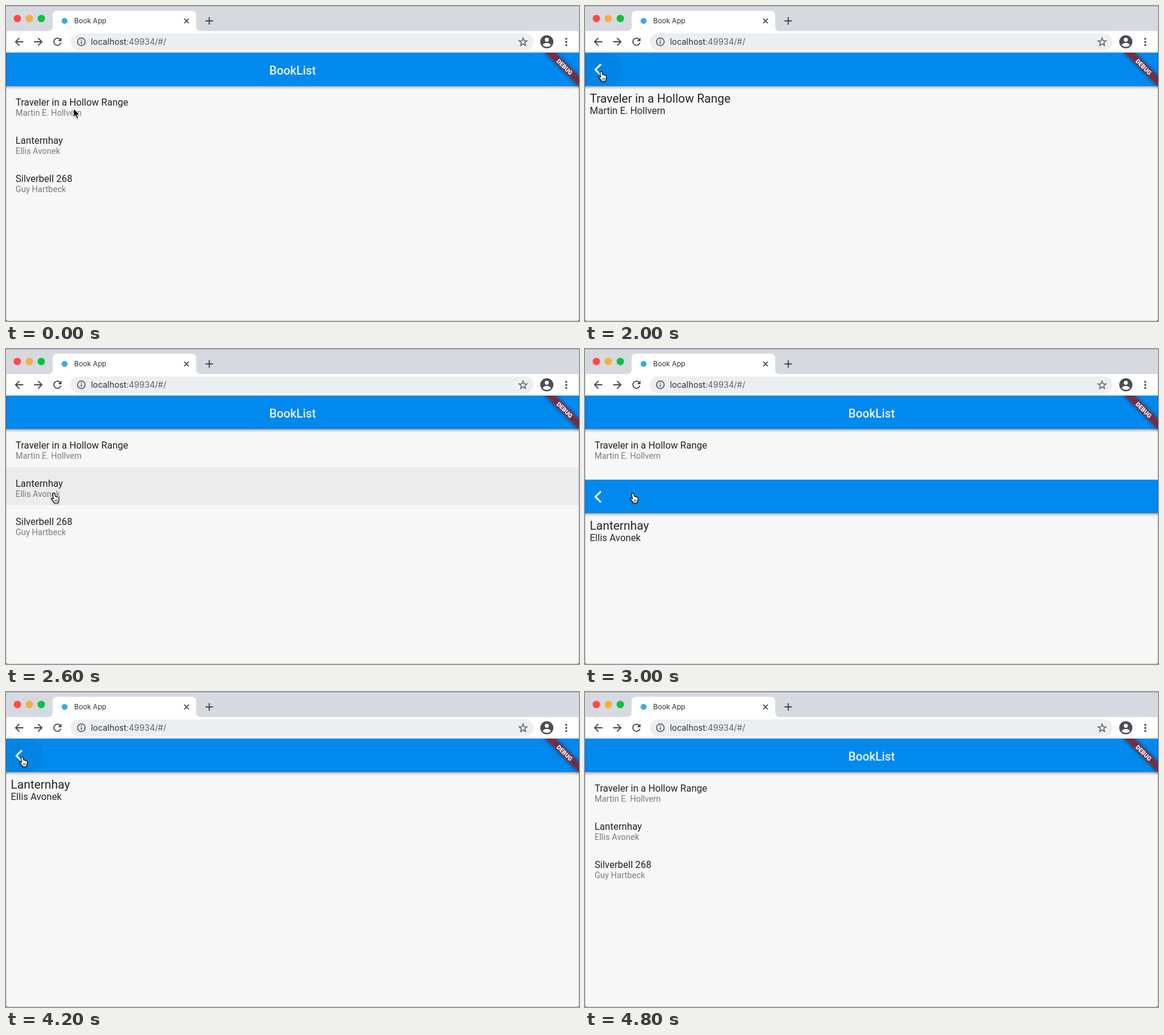
Write an HTML page that moves like this. It is 958 px wide and 528 px high and loops after 5000 ms.

```html
<!DOCTYPE html>
<html lang="en">
<head>
<meta charset="utf-8">
<title>Book App</title>
<style>
  html, body { margin: 0; width: 100%; height: 100%; overflow: hidden; background: #d6d9e0; }
  svg { display: block; width: 958px; height: 528px; }
  text { font-family: Roboto, "Noto Sans", sans-serif; white-space: pre; }
  .chrome { font-family: Inter, "Open Sans", sans-serif; }
  .icon { fill: none; stroke: #484b50; stroke-width: 1.9; }
</style>
</head>
<body>
<svg viewBox="0 0 958 528" xmlns="http://www.w3.org/2000/svg">
  <defs>
    <clipPath id="app"><rect y="78" width="958" height="450"/></clipPath>
    <linearGradient id="shade" x2="0" y2="1">
      <stop offset="0" stop-color="#000" stop-opacity=".42"/>
      <stop offset=".35" stop-color="#000" stop-opacity=".16"/>
      <stop offset="1" stop-color="#000" stop-opacity="0"/>
    </linearGradient>
    <filter id="blur" x="-50%" y="-150%" width="200%" height="400%"><feGaussianBlur stdDeviation="3.5"/></filter>
    <filter id="drop" x="-50%" y="-50%" width="200%" height="200%">
      <feDropShadow dx="0" dy="1.2" stdDeviation="1" flood-opacity=".4"/>
    </filter>
    <g id="bar">
      <rect y="134" width="958" height="6" fill="url(#shade)"/>
      <rect y="78" width="958" height="56" fill="#0289ee"/>
    </g>
  </defs>

  <!-- Browser window -->
  <rect width="958" height="42" fill="#d6d9e0"/>
  <rect width="958" height="1" fill="#b0b2b7"/>
  <circle cx="19" cy="21" r="6.2" fill="#fc4b4a"/>
  <circle cx="39" cy="21" r="6.2" fill="#f5b03e"/>
  <circle cx="59" cy="21" r="6.2" fill="#0fbf46"/>
  <path d="M70 42Q78 42 78 34V16Q78 8 86 8H310Q318 8 318 16V34Q318 42 326 42Z" fill="#fff"/>
  <rect y="42" width="958" height="36" fill="#fff"/>
  <circle cx="98" cy="25" r="5" fill="#3fa9e2"/>
  <text class="chrome" x="114" y="29.2" font-size="11.7" fill="#303236">Book App</text>
  <g class="icon">
    <path d="M298 21.2L305.6 28.8M305.6 21.2L298 28.8" stroke-width="1.7"/>
    <path d="M333.5 25H346M339.8 18.8V31.2" stroke-width="2"/>
    <path d="M29 60H16.3M22.4 53.6L16 60L22.4 66.4"/>
    <path d="M47 60H59.7M53.6 53.6L60 60L53.6 66.4"/>
    <path d="M90.6 56A6 6 0 1 0 91.8 61.5"/>
  </g>
  <path d="M92.8 53V59H86.8Z" fill="#484b50"/>
  <rect x="108" y="46" width="774" height="28" rx="14" fill="#eceef0"/>
  <g class="icon">
    <circle cx="126" cy="60" r="6.4" style="stroke-width:1.5"/>
    <path d="M126 59.2V63.6M126 56.3V57.9" style="stroke-width:1.6"/>
  </g>
  <text class="chrome" x="142" y="65" font-size="13.9" fill="#303236">localhost<tspan fill="#606368">:49934/#/</tspan></text>
  <path id="star" class="icon" style="stroke-width:1.5;stroke:#5f6368"/>
  <circle cx="904.2" cy="60" r="11" fill="#4b4d52"/>
  <circle cx="904.2" cy="56.6" r="3.4" fill="#fff"/>
  <path d="M897.4 65.6C898.4 60.8 910 60.8 911 65.6C907.5 69.6 900.9 69.6 897.4 65.6Z" fill="#fff"/>
  <g fill="#484b50">
    <circle cx="936.7" cy="55" r="1.7"/><circle cx="936.7" cy="60.2" r="1.7"/><circle cx="936.7" cy="65.4" r="1.7"/>
  </g>

  <!-- App -->
  <g clip-path="url(#app)">
    <rect y="78" width="958" height="450" fill="#f7f7f7"/>
    <rect id="hover" width="958" height="64" fill="#ececec"/>
    <g id="rows"></g>
    <use href="#bar"/>
    <text x="479.2" y="115" text-anchor="middle" font-size="19.8" font-weight="500" fill="#eaf5fe">BookList</text>
    <g id="detail">
      <rect y="78" width="958" height="450" fill="#f7f7f7"/>
      <use href="#bar"/>
      <path id="press" d="M0 87.5A34 34 0 0 1 9 78H47A34 34 0 0 1 47 134H9A34 34 0 0 1 0 126Z" fill="#000" opacity=".04"/>
      <path d="M26.6 97.6L17.4 106.8L26.6 116" fill="none" stroke="#fff" stroke-width="2.9"/>
      <text id="title" x="8" y="162" font-size="20" fill="#262626"></text>
      <text id="author" x="8" y="181" font-size="16" fill="#262626"></text>
    </g>
    <g transform="translate(958 78) rotate(45)">
      <rect x="-42" y="28" width="84" height="12" opacity=".5" filter="url(#blur)"/>
      <rect x="-42" y="28" width="84" height="12" fill="#b71c1c" opacity=".63"/>
      <text y="37.7" text-anchor="middle" font-size="10.2" font-weight="900" fill="#fff">DEBUG</text>
    </g>
  </g>
  <path d="M.5 42V528M957.5 42V528M0 527.5H958" stroke="#000" stroke-opacity=".17" fill="none"/>
  <path d="M0 525V528H3Q0 528 0 525ZM958 525V528H955Q958 528 958 525Z" fill="#222"/>

  <g id="cursor" filter="url(#drop)" stroke-linejoin="round">
    <path id="arrow" d="M0 0V14.2L3.2 11.3L5.7 17L8 16L5.6 10.4H10Z" fill="#000" stroke="#fff" stroke-width="1"/>
    <g id="hand" stroke="#000" stroke-width="1.1" fill="#fff">
      <path d="M4.5 1C6 .6 6.4 1.6 6.7 3L7.4 6.2C8.4 5.6 9.2 6 9.5 6.8C10.5 6.3 11.3 6.7 11.6 7.6C12.8 7.2 13.6 8 13.6 9.4C13.7 12 12.6 13.5 12.4 17H5.8C5 14.5 2.6 12.5 1 10.4C.4 9.2 1.8 8.3 3.2 9.4L4.4 10.3L3.2 3C3 2 3.5 1.2 4.5 1Z"/>
      <path d="M6.9 11.5V14.6M8.7 11.5V14.6M10.5 11.5V14.6" stroke-width=".8"/>
    </g>
  </g>
</svg>
<script>
const LOOP = 5000;
const PAGE_HEIGHT = 450;
const LIST_TOP = 134;
const ROW_HEIGHT = 64;
const books = [
  ["Traveler in a Hollow Range", "Martin E. Hollvern"],
  ["Lanternhay", "Ellis Avonek"],
  ["Silverbell 268", "Guy Hartbeck"],
];

// slide: 0 = detail page open, 1 = closed.
const poses = [
  { at: 0, cursor: ["arrow", 113, 172] },
  { at: 400, cursor: ["hand", 108, 173], row: 0 },
  { at: 800, cursor: ["hand", 110, 174], row: 0 },
  { at: 1000, cursor: ["arrow", 123, 262], book: 0, slide: 0 },
  { at: 1400, cursor: ["arrow", 70, 190], book: 0, slide: 0 },
  { at: 1600, cursor: ["hand", 28, 116], book: 0, slide: 0, press: true },
  { at: 1800, cursor: ["hand", 22, 109], book: 0, slide: 0, press: true },
  { at: 2200, cursor: ["arrow", 24, 108], book: 0, slide: 0.595, press: true },
  { at: 2400, cursor: ["hand", 70, 225], row: 1 },
  { at: 2600, cursor: ["hand", 75, 241], row: 1 },
  { at: 3000, cursor: ["hand", 75, 241], book: 1, slide: 0.314 },
  { at: 3200, cursor: ["arrow", 82, 245], book: 1, slide: 0 },
  { at: 3400, cursor: ["arrow", 100, 222], book: 1, slide: 0 },
  { at: 3600, cursor: ["arrow", 113, 183], book: 1, slide: 0 },
  { at: 3800, cursor: ["arrow", 58, 138], book: 1, slide: 0 },
  { at: 4000, cursor: ["hand", 22, 108], book: 1, slide: 0, press: true },
  { at: 4400, cursor: ["arrow", 22, 102], book: 1, slide: 0.5, press: true },
  { at: 4600 },
];

const el = id => document.getElementById(id);
const show = (id, on) => { el(id).style.display = on ? "" : "none"; };
const move = (id, x, y) => el(id).setAttribute("transform", `translate(${x} ${y})`);

function addText(parent, content, attrs) {
  const node = document.createElementNS("http://www.w3.org/2000/svg", "text");
  for (const key in attrs) node.setAttribute(key, attrs[key]);
  node.textContent = content;
  parent.append(node);
}

books.forEach(([title, author], i) => {
  const top = LIST_TOP + i * ROW_HEIGHT;
  addText(el("rows"), title, { x: 16, y: top + 33, "font-size": 16, fill: "#222" });
  addText(el("rows"), author, { x: 16, y: top + 50, "font-size": 14, fill: "#7c7c7c" });
});

const starPoints = Array.from({ length: 10 }, (_, i) => {
  const radius = i % 2 ? 3 : 7, angle = i * Math.PI / 5 - Math.PI / 2;
  return `${864.5 + radius * Math.cos(angle)} ${60.6 + radius * Math.sin(angle)}`;
});
el("star").setAttribute("d", `M${starPoints.join("L")}Z`);

function render(time) {
  const pose = poses.findLast(p => p.at <= time);
  const { cursor, row, book, slide, press } = pose;

  show("hover", row !== undefined);
  if (row !== undefined) move("hover", 0, LIST_TOP + row * ROW_HEIGHT);

  show("detail", book !== undefined);
  if (book !== undefined) {
    [el("title").textContent, el("author").textContent] = books[book];
    move("detail", 0, Math.round(slide * PAGE_HEIGHT));
    show("press", press);
  }

  show("cursor", cursor);
  if (cursor) {
    const [shape, x, y] = cursor;
    show("arrow", shape === "arrow");
    show("hand", shape === "hand");
    move("cursor", x, y);
  }
}

const start = performance.now();
function tick() {
  render((performance.now() - start) % LOOP);
  requestAnimationFrame(tick);
}
tick();
</script>
</body>
</html>
```
